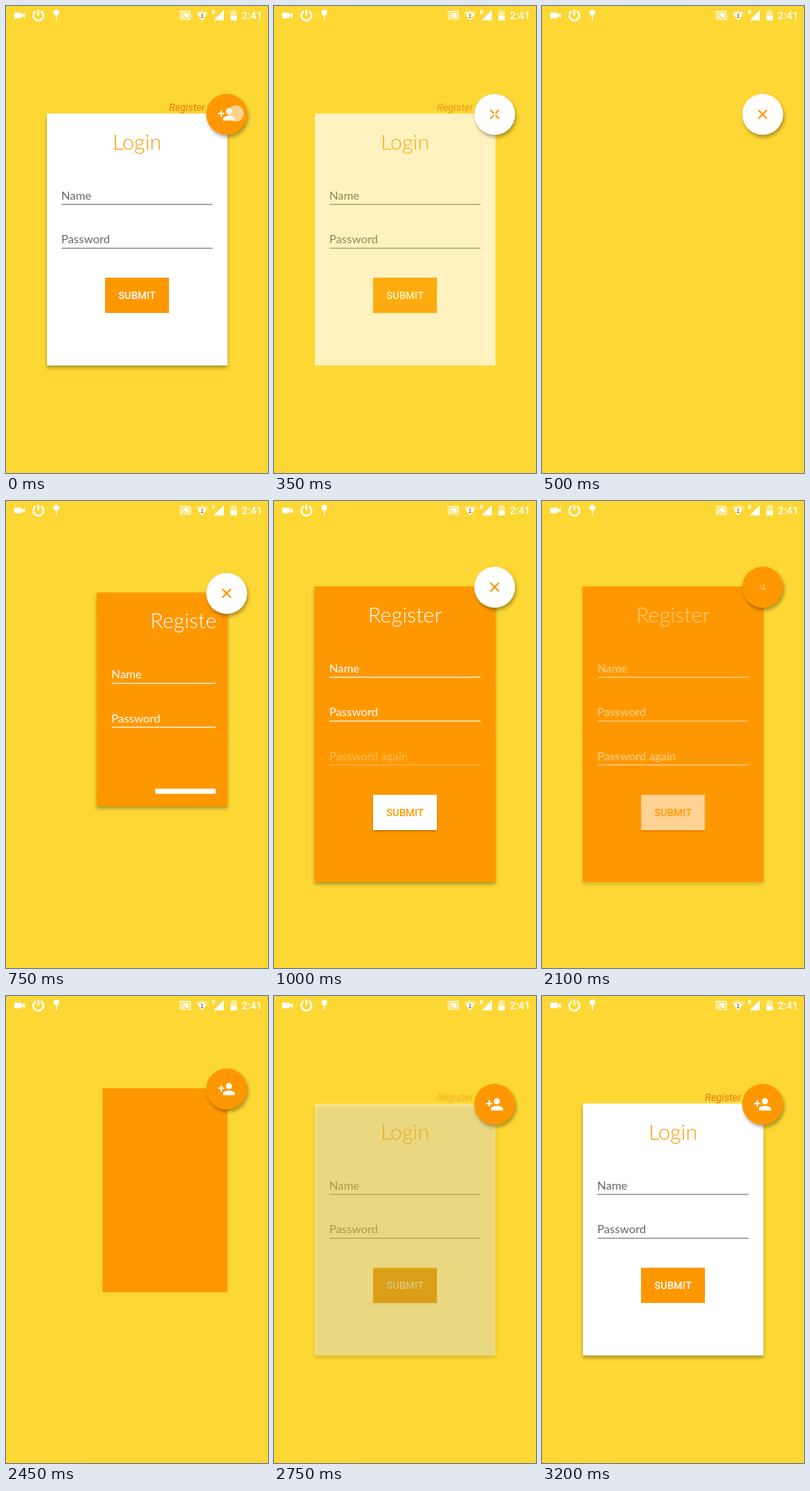
Recreate the animation shown at these times as an HTML page. Size 320x569 px, loop 3250 ms.

```html
<!DOCTYPE html>
<html lang="en">
<head>
<meta charset="utf-8">
<title>Login and register</title>
<style>
  html, body { margin: 0; width: 100%; height: 100%; overflow: hidden; background: #fdd734; }
  svg { display: block; }
  #stage { position: fixed; inset: 0; width: 100%; height: 100%; }
  .title { font: 300 26px Lato, sans-serif; text-anchor: middle; }
  .field { font: 400 14.2px Lato, sans-serif; }
  .submit { font: 500 12.5px Roboto, sans-serif; text-anchor: middle; }
  .hint { font: italic 400 12.4px Roboto, sans-serif; }
  .clock { font: 500 12.6px Roboto, sans-serif; }
  .tiny { font: 700 6.5px Roboto, sans-serif; }
</style>
</head>
<body>
<svg id="stage" viewBox="0 0 320 569">
  <defs>
    <filter id="soft" x="-20%" y="-20%" width="140%" height="140%"><feGaussianBlur stdDeviation="2"/></filter>
    <filter id="faint" x="-20%" y="-20%" width="140%" height="140%"><feGaussianBlur stdDeviation="1"/></filter>
  </defs>
  <rect width="320" height="569" fill="#fdd734"/>

  <g id="status" fill="#fff">
    <path d="M11 8h7q1 0 1 1v1.7l4-2.5v6.6l-4-2.5v1.7q0 1-1 1h-7q-1 0-1-1V9q0-1 1-1z"/>
    <path d="M36.3 6.3a6.2 6.2 0 1 0 6.4 0M39.5 4.5v7" fill="none" stroke="#fff" stroke-width="2.2"/>
    <circle cx="61.5" cy="8" r="3.5"/>
    <path d="M61 10h1.2v7.5H61z"/>
    <g transform="translate(211.4 4.1) scale(.62)">
      <path d="M21 3H3c-1.1 0-2 .9-2 2v3h2V5h18v14h-7v2h7c1.1 0 2-.9 2-2V5c0-1.1-.9-2-2-2zM1 18v3h3c0-1.66-1.34-3-3-3zm0-4v2c2.76 0 5 2.24 5 5h2c0-3.87-3.13-7-7-7zm0-4v2c4.97 0 9 4.03 9 9h2c0-6.08-4.93-11-11-11z"/>
      <path d="M19 7H5v1.63c3.96 1.28 7.09 4.41 8.37 8.37H19V7z"/>
    </g>
    <path d="M232 8q7.500-5 15 0l-7.500 9.500z" opacity=".45"/>
    <path d="M234 10.500q5.500-4 11 0l-5.500 7z"/>
    <path d="M237.800 11.500l1.700-2 1.700 2zM237.800 13l1.700 2 1.700-2z" fill="#6b6130"/>
    <path d="M266 5v12.500h-12.500z"/>
    <text class="tiny" x="251.500" y="10">R</text>
    <path d="M276 5h4v1.300h2V12h-8V6.300h2z" opacity=".5"/>
    <path d="M274 12h8v5.500h-8z"/>
    <text class="clock" x="288" y="16">2:41</text>
  </g>

  <g id="loginShade" filter="url(#soft)"><rect x="50" y="134" width="220.500" height="307"/></g>
  <g id="loginBtnShade" filter="url(#faint)"><rect x="121" y="332.500" width="78" height="43"/></g>
  <g id="login">
    <text class="hint" x="199" y="127.500" fill="#ee7a08">Register</text>
    <rect x="50" y="131" width="220.500" height="307" fill="#fff"/>
    <g id="loginForm" transform="translate(49.500 131)"></g>
  </g>

  <g id="register">
    <rect id="regShade" filter="url(#soft)"/>
    <rect id="regCard" fill="#ff9800"/>
    <svg id="regClip" overflow="hidden"><g id="regForm"></g></svg>
  </g>

  <g id="fab">
    <circle cx="1.500" cy="3" r="25" filter="url(#soft)" opacity=".32"/>
    <circle r="25" fill="#ff9800"/>
    <circle id="white" r="25" fill="#fff"/>
    <g id="person" fill="#fff">
      <path transform="scale(.93) translate(-12 -12)" d="M15 12c2.210 0 4-1.790 4-4s-1.790-4-4-4-4 1.790-4 4 1.790 4 4 4zm-9-2V7H4v3H1v2h3v3h2v-3h3v-2H6zm9 4c-2.670 0-8 1.340-8 4v2h16v-2c0-2.660-5.330-4-8-4z"/>
    </g>
    <path id="cross" fill="none" stroke="#ff9800" stroke-width="1.900"/>
    <circle id="touch" cx="11" cy="-1" r="10" fill="#fff3dc"/>
  </g>
</svg>

<script>
const LOOP = 3250;
const $ = id => document.getElementById(id);
const set = (id, attrs) => {
  for (const name in attrs) $(id).setAttribute(name, attrs[name]);
};
const fade = (id, value) => $(id).setAttribute('opacity', value);
const ramp = (t, from, to) => Math.min(1, Math.max(0, (t - from) / (to - from)));
const ease = x => x < .5 ? 2 * x * x : 1 - 2 * (1 - x) ** 2;
// Rises over a..b, stays at 1, falls over c..d
const hold = (t, a, b, c, d) => ramp(t, a, b) - ramp(t, c, d);

const field = (label, row, ink, line) => {
  const y = 105 + row * 53.4;
  return `<text class="field" x="18" y="${y}" fill="${ink}">${label}</text>
    <rect x="18.3" y="${y + 5.2}" width="184.500" height="1.100" fill="${line}"/>`;
};
const title = (label, ink) =>
  `<text class="title" x="110.500" y="44" fill="${ink}">${label}</text>`;
const button = (fill, ink) =>
  `<rect width="78" height="43" fill="${fill}"/>
   <text class="submit" x="39" y="26.200" fill="${ink}">SUBMIT</text>`;

$('loginForm').innerHTML = title('Login', '#ff9800')
  + field('Name', 0, '#666', '#777') + field('Password', 1, '#666', '#777')
  + `<g transform="translate(71.500 200)">${button('#ff9800', '#fff')}</g>`;

$('regForm').innerHTML = title('Register', '#fff')
  + field('Name', 0, '#fff', '#fff') + field('Password', 1, '#fff', '#fff')
  + `<g id="again">${field('Password again', 2, '#fff', '#fff')}</g>
     <g id="regBtn"><rect y="1.500" width="78" height="43" opacity=".28" filter="url(#faint)"/>
     ${button('#fff', '#ff9800')}</g>`;

function drawLogin(t) {
  const closing = t > 1500;
  const shown = closing ? ramp(t, 2670, 2870) : 1 - ramp(t, 290, 490);
  const shade = closing ? shown : 1 - ramp(t, 100, 290);
  fade('login', shown);
  fade('loginShade', .3 * shade);
  fade('loginBtnShade', .3 * shade);
}

function drawRegister(t, grow) {
  const left = 270.5 - 221 * grow;
  const top = 131 - 27 * grow;
  const width = 221 * grow;
  const height = 360 * grow;
  $('register').setAttribute('visibility', grow > 0 ? 'visible' : 'hidden');
  set('regCard', { x: left, y: top, width, height });
  set('regShade', { x: left, y: top + 3, width, height, opacity: .3 * (1 - ramp(t, 1980, 2220)) });
  set('regClip', {
    x: left, y: top,
    width: Math.max(0, width - 14.5), height: Math.max(0, height - 15),
    opacity: 1 - ramp(t, 2000, 2240)
  });
  fade('again', ramp(t, 900, 1200));
  set('regBtn', { transform: `translate(71.500 ${200 + 54 * Math.min(1, t > 1500 ? 1 : grow)})` });
}

function drawFab(t, grow) {
  set('fab', { transform: `translate(269.500 ${132 - 27 * grow})` });
  fade('white', hold(t, 100, 250, 1880, 2040));
  const person = 1 - hold(t, 60, 220, 2020, 2220);
  set('person', { transform: `scale(${person})`, opacity: person });

  // Four arms grow from the corners to the centre
  const arm = hold(t, 230, 380, 1780, 1940);
  const inner = 5.3 * (1 - arm);
  let path = '';
  for (const x of [-1, 1]) for (const y of [-1, 1]) {
    path += `M${x * 5.3} ${y * 5.3}L${x * inner} ${y * inner}`;
  }
  set('cross', { d: path, opacity: arm > 0 ? 1 : 0 });

  const press = t < 1000 ? 1 - ramp(t, 60, 160) : hold(t, 1620, 1670, 1780, 1840);
  fade('touch', .65 * press);
}

function draw(t) {
  const grow = ease(ramp(t, 510, 894)) - ease(ramp(t, 2300, 2684));
  drawLogin(t);
  drawRegister(t, grow);
  drawFab(t, grow);
}

const start = performance.now();
function tick() {
  draw((performance.now() - start) % LOOP);
  requestAnimationFrame(tick);
}
tick();
</script>
</body>
</html>
```
